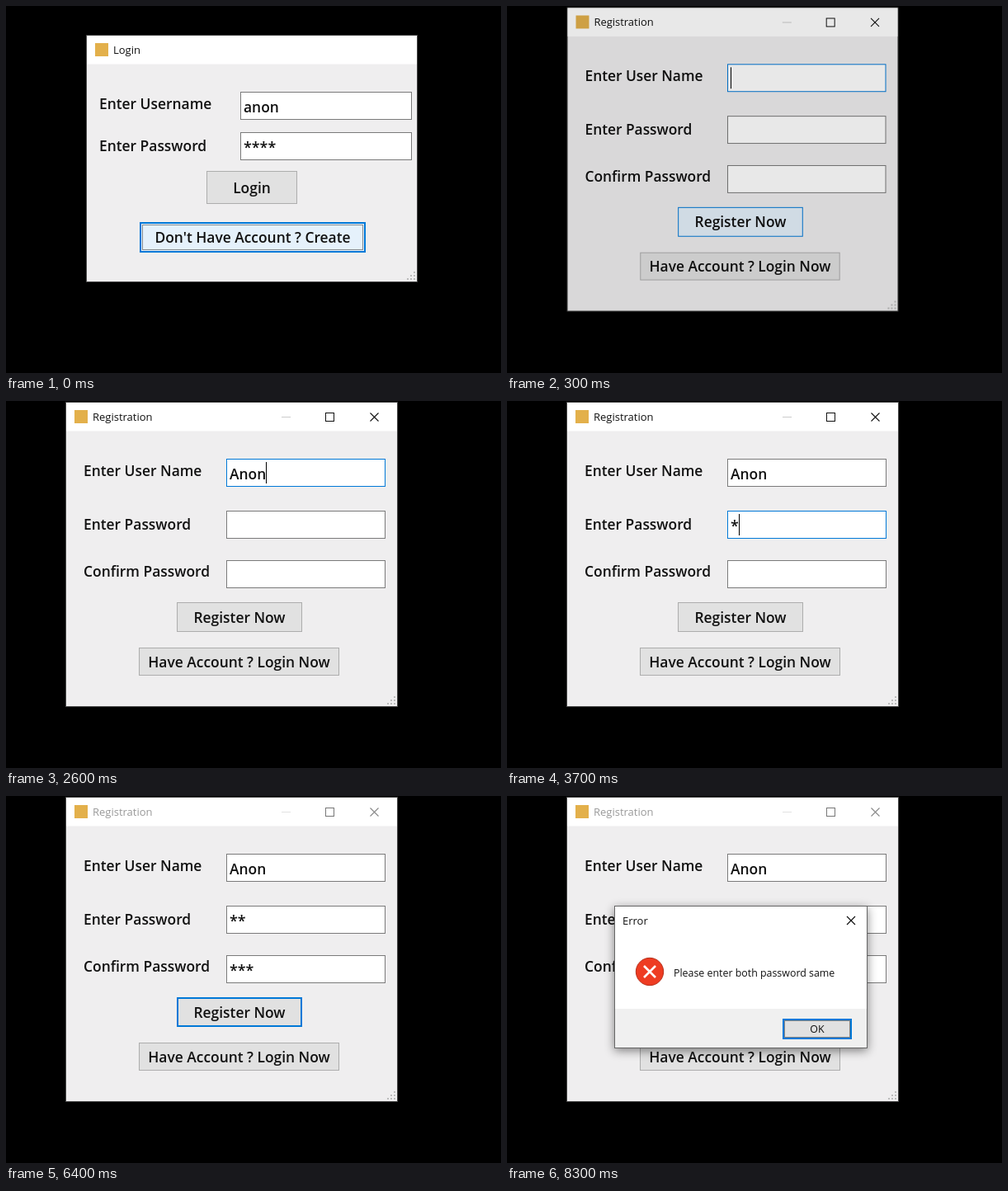
These frames come from a looping animation (600x445 px, 8400 ms). An HTML page:

```html
<!DOCTYPE html>
<html lang="en">
<head>
<meta charset="utf-8">
<title>Login and registration</title>
<style>
  html, body { margin: 0; width: 100%; height: 100%; overflow: hidden; background: #000; }
  svg { display: block; }
  text { font: 13px "Open Sans", sans-serif; fill: #111; white-space: pre; }
  .form { font-size: 17.4px; font-weight: 600; }
  .stars { font-size: 17.9px; font-weight: 600; }
  .message { font-size: 12.4px; }
</style>
</head>
<body>
<svg id="stage" width="600" height="445" viewBox="0 0 600 445"></svg>
<script>
const LOOP = 8400, STEP = 100;
const BLUE = '#0078d7', GREY = '#7a7a7a', BODY = '#efeeef', BUTTON = '#e1e1e1', HOVER = '#e5f1fb';

// Username, password, confirmation: when each gets focus and its keystrokes
const fields = [
  { y: 70, focus: 200, value: 'Anon', keys: [2000, 2100, 2400, 2600] },
  { y: 133, focus: 3000, value: '**', keys: [3500, 3900] },
  { y: 193, focus: 4800, value: '***', keys: [5000, 5300, 5600] }
];
const SUBMIT_FOCUS = 5900, SUBMIT = 6400;

const stage = document.getElementById('stage');
const pen = document.createElement('canvas').getContext('2d');
const clamp = v => Math.max(0, Math.min(1, v));

const fill = (x, y, w, h, color) =>
  `<rect x="${x}" y="${y}" width="${w}" height="${h}" fill="${color}"/>`;
// The border lies inside the given size
const box = (x, y, w, h, color, stroke, width = 1, extra = '') =>
  `<rect x="${x + width / 2}" y="${y + width / 2}" width="${w - width}" height="${h - width}"
    fill="${color}" stroke="${stroke}" stroke-width="${width}" ${extra}/>`;
const dotted = (x, y, w, h) => box(x, y, w, h, 'none', '#222', 1, 'stroke-dasharray="1 1"');
const line = (d, color, width = 1) => `<path d="${d}" fill="none" stroke="${color}" stroke-width="${width}"/>`;
const cross = (x, y, r, color, width) =>
  line(`M${x - r} ${y - r}l${2 * r} ${2 * r}m0 ${-2 * r}l${-2 * r} ${2 * r}`, color, width);
const text = (x, y, s, cls = '', extra = '') => `<text x="${x}" y="${y}" class="${cls}" ${extra}>${s}</text>`;
const label = (x, y, s) => text(x, y, s, 'form');
const centered = (x, y, s, cls = 'form') => text(x, y, s, cls, 'text-anchor="middle"');
const group = (opacity, content, transform = '') =>
  opacity > 0 ? `<g opacity="${opacity}" transform="${transform}">${content}</g>` : '';

function input(x, y, w, value, border) {
  return box(x, y, w, 34, '#fff', border) +
    text(x + 4, y + 24.5, value, value[0] === '*' ? 'stars' : 'form');
}

function button(x, y, w, h, caption, color = BUTTON, border = '#adadad', width = 1) {
  return box(x, y, w, h, color, border, width) + centered(x + w / 2, y + h / 2 + 6.5, caption);
}

function frameWindow(x, y, w, h, title, titleColor = '#111') {
  let grip = '';
  for (let row = 0; row < 3; row++)
    for (let col = 0; col <= row; col++)
      grip += fill(x + w - 4 - col * 4, y + h - 12 + row * 4, 2, 2, '#bcbcbc');
  return box(x - 1, y - 1, w + 2, h + 2, BODY, '#484848') + fill(x, y, w, 34.5, '#fff') +
    fill(x + 10, y + 9, 16, 16, '#e3b04b') +
    text(x + 32, y + 22, title, '', `style="fill:${titleColor}"`) + grip;
}

function login() {
  return frameWindow(98, 36, 400, 298, 'Login') +
    label(113, 124.5, 'Enter Username') + input(284, 104, 208, 'anon', GREY) +
    label(113, 176, 'Enter Password') + input(284, 153, 208, '****', GREY) +
    button(243, 200, 110, 40, 'Login') +
    button(162, 262, 274, 37, "Don't Have Account ? Create", HOVER, BLUE, 2) + dotted(165, 265, 268, 31);
}

function formField(field, next, t) {
  const typed = field.value.slice(0, field.keys.filter(k => k <= t).length);
  const focused = t < next && (t >= field.focus || field === fields[0]);
  const fading = t >= next && t < next + 100;
  const idle = t >= 400 && t < 1000 ? '#4d4d4d' : GREY;
  let out = input(267, field.y, 193, typed, focused || fading ? BLUE : idle);
  const lastInput = Math.max(field.focus, ...field.keys.filter(k => k <= t));
  if (focused && (t - lastInput) % 1060 < 530) {
    pen.font = `600 ${typed[0] === '*' ? 17.9 : 17.4}px "Open Sans", sans-serif`;
    out += fill(Math.round(271 + pen.measureText(typed).width), field.y + 4, 1, 26, '#000');
  }
  return out;
}

function registration(t) {
  const active = t < SUBMIT, ink = active ? '#111' : '#999';
  const hovered = t < 600, ready = t >= SUBMIT_FOCUS;
  return frameWindow(73, 2, 401, 368, 'Registration', ink) +
    line('M334 19.5h11', active ? '#ccc' : '#e2e2e2') +
    box(387, 14, 11, 11, 'none', active ? '#111' : '#777') + cross(446.5, 19.5, 5, active ? '#111' : '#888', 1.1) +
    label(94, 91, 'Enter User Name') + label(94, 156, 'Enter Password') + label(94, 213, 'Confirm Password') +
    fields.map((f, i) => formField(f, i < 2 ? fields[i + 1].focus : SUBMIT_FOCUS, t)).join('') +
    button(207, 244, 152, 36, 'Register Now', hovered ? HOVER : BUTTON,
      hovered || ready ? BLUE : '#adadad', ready ? 2 : 1) +
    button(161, 299, 243, 34, 'Have Account ? Login Now');
}

function errorDialog() {
  return '<rect x="130" y="133" width="307" height="173" style="filter:drop-shadow(0 3px 6px #0007)"/>' +
    box(130, 133, 307, 173, '#fff', '#666') + fill(131, 258, 305, 47, '#f0f0f0') +
    text(140, 156, 'Error') + cross(417, 151, 5, '#111', 1.2) +
    '<circle cx="173" cy="213" r="16.7" fill="#ee3c22" stroke="#b5301c"/>' + cross(173, 213, 7, '#fff', 2.6) +
    text(202, 218.5, 'Please enter both password same', 'message') +
    box(334, 270, 84, 25, BUTTON, BLUE, 2) + dotted(336, 272, 80, 21) +
    centered(376, 287, 'OK', 'message');
}

// Windows fade in while growing slightly about their centre
function opening(t, start, cx, cy, content) {
  const shown = 1 - (1 - clamp((t - start) / 250)) ** 1.5;
  const scale = .97 + .03 * shown;
  return group(shown, content, `translate(${cx} ${cy}) scale(${scale}) translate(${-cx} ${-cy})`);
}

function draw(t) {
  stage.innerHTML = fill(0, 0, 600, 445, '#000') +
    group(clamp((250 - t) / 200), login()) +
    opening(t, 100, 273.5, 186, registration(t)) +
    opening(t, SUBMIT, 283.5, 219.5, errorDialog());
}

const begin = performance.now();
let drawn = -1;
function tick() {
  const t = Math.floor((performance.now() - begin) % LOOP / STEP) * STEP;
  if (t !== drawn) draw(drawn = t);
  requestAnimationFrame(tick);
}
tick();
</script>
</body>
</html>
```
